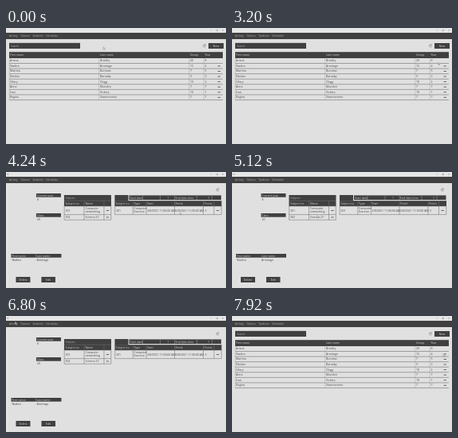
These frames come from a looping animation (276x146 px, 8 s). An HTML page:

```html
<!DOCTYPE html>
<html lang="en">
<head>
<meta charset="utf-8">
<title>Student records</title>
<style>
html, body { margin: 0; width: 100%; height: 100%; overflow: hidden; background: #e0e0e0; }
svg { display: block; width: 276px; height: 146px; }
text { font-family: "Open Sans", "Noto Sans", sans-serif; font-size: 3.5px; fill: #484848; }
.light { fill: #d2d2d2; }
.menu { fill: #b4b4b4; font-size: 3.2px; }
</style>
</head>
<body>
<svg viewBox="0 0 276 146" xmlns="http://www.w3.org/2000/svg">
  <rect width="276" height="146" fill="#e8e8e8"/>
  <g id="list"></g>
  <g id="detail"></g>
  <g id="chrome"></g>
  <path id="pointer" d="M0 0V3.1L.8 2.4 1.4 3.5 1.9 3.2 1.4 2.2H2.3Z" fill="#f4f4f4" stroke="#555" stroke-width=".35"/>
</svg>
<script>
const NS = "http://www.w3.org/2000/svg";
const DARK = "#404040";
const LOOP = 8000;
const byId = id => document.getElementById(id);
const list = byId("list"), detail = byId("detail"), chrome = byId("chrome"), pointer = byId("pointer");

function add(parent, tag, attrs) {
  const el = document.createElementNS(NS, tag);
  for (const key in attrs) el.setAttribute(key, attrs[key]);
  return parent.appendChild(el);
}
const box = (p, x, y, w, h, fill = DARK) => add(p, "rect", { x, y, width: w, height: h, fill });
const line = (p, d, stroke = "#707070", width = .6) =>
  add(p, "path", { d, stroke, "stroke-width": width, fill: "none" });
function label(p, x, y, str, cls = "", anchor = "start") {
  add(p, "text", { x, y, class: cls, "text-anchor": anchor }).textContent = str;
}
function button(p, x, y, w, str) {
  box(p, x, y, w, 7);
  label(p, x + w / 2, y + 4.8, str, "light", "middle");
}
const refresh = (p, x, y) => {
  line(p, `M${x + 1} ${y - 1}A1.5 1.5 0 1 0 ${x + 1.4} ${y + .6}`, "#555", .55);
  line(p, `M${x + 1.5} ${y - 1.8}V${y - .7}H${x + .4}`, "#555", .45);
};
const dash = (p, x, y) => line(p, `M${x - 1.7} ${y}h3.4`, "#444", .8);

function buildList() {
  const p = list;
  box(p, 0, 14, 276, 132, "#e0e0e0");
  box(p, 4, 18.8, 89, 7.2);
  label(p, 6, 23.7, "Search", "menu");
  refresh(p, 249, 22.3);
  button(p, 254, 19, 19, "New");
  box(p, 4, 30.2, 268, 7.8);
  [[5, "First name"], [118, "Last name"], [231, "Group"], [249.5, "Year"]]
    .forEach(([x, s]) => label(p, x, 35.3, s, "light"));
  const rows = [
    ["Ariana", "Bradley", "20", "8"], ["Nadine", "Armitage", "15", "4"],
    ["Martina", "Burrows", "7", "5"], ["Nicolas", "Barnaby", "9", "3"],
    ["Hilary", "Clegg", "10", "2"], ["Anna", "Mundon", "7", "7"],
    ["Ivan", "Vickery", "10", "1"], ["Regina", "Stanmoreton", "7", "7"]
  ];
  rows.forEach((row, i) => {
    const y = 41.1 + i * 6.58;
    [5, 118, 231, 249.5].forEach((x, c) => label(p, x, y + 1.2, row[c]));
    line(p, `M4 ${y + 3.4}H272`);
    if (i) dash(p, 267.3, y + .2);
  });
  line(p, "M4.2 38V90.5M116.7 38V90.5M229.8 38V90.5M248.2 38V90.5", "#8c8c8c", .35);
}

function field(p, x, y, w, name, value) {
  box(p, x, y, w, 4.7);
  label(p, x + 1, y + 3.6, name, "light");
  label(p, x + 1, y + 8.6, value);
}

function grid(p, xs, ys) {
  const x0 = xs[0], x1 = xs[xs.length - 1], y0 = ys[0], y1 = ys[ys.length - 1];
  line(p, xs.map(x => `M${x} ${y0}V${y1}`).join("") + ys.map(y => `M${x0} ${y}H${x1}`).join(""), "#666", .5);
}

function buildDetail() {
  const p = detail;
  box(p, 0, 14, 276, 132, "#e0e0e0");
  refresh(p, 264, 22.3);
  field(p, 36.5, 27, 31, "Current year", "8");
  field(p, 36.5, 52, 31, "Class", "20");
  field(p, 5, 103, 31, "First name", "Nadine");
  field(p, 36, 103, 32, "Last name", "Armitage");
  button(p, 11, 132, 18, "Delete");
  button(p, 43, 132, 17.5, "Edit");

  box(p, 71.5, 29, 59, 14);
  label(p, 73, 33.8, "Subjects", "menu");
  label(p, 73, 41, "Subject no.", "light");
  label(p, 98, 41, "Name", "light");
  line(p, "M71.5 36.2H130.5M96.5 36.2V43M121.5 36.2V43", "#858585", .4);
  grid(p, [71.7, 96.5, 121.5, 130.3], [43, 53.6, 60.3]);
  label(p, 73, 49.5, "301");
  label(p, 98, 47.1, "Computer");
  label(p, 98, 51.4, "networking");
  label(p, 73, 58.3, "302");
  label(p, 98, 58.3, "Science 27");
  dash(p, 126, 48.5);
  dash(p, 126, 57);

  box(p, 135, 29, 17, 7.4);
  box(p, 153, 29.4, 115.5, 5.6);
  label(p, 154, 33.5, "Start date", "light");
  label(p, 201, 33.5, "1", "light");
  label(p, 211, 33.5, "End date time", "light");
  label(p, 252, 33.5, "1", "light");
  line(p, "M170 29.4V35M192 29.4V35M210 29.4V35M238 29.4V35M257 29.4V35", "#a0a0a0", .5);
  box(p, 135, 36.2, 134, 6.8);
  [[136, "Subject no."], [159, "Type"], [175.5, "Start"], [211, "Finish"], [247, "Points"]]
    .forEach(([x, s]) => label(p, x, 41, s, "light"));
  line(p, "M157.8 36.2V43M174.5 36.2V43M210 36.2V43M246 36.2V43M259.5 36.2V43", "#858585", .4);
  grid(p, [135.2, 157.8, 174.5, 210, 246, 259.5, 268.8], [43, 53.6]);
  label(p, 136.5, 49.5, "301");
  label(p, 159, 47.1, "Computer");
  label(p, 159, 51.4, "Exercise");
  label(p, 175.5, 49.5, "2/8/2021 11:00:00 AM");
  label(p, 211, 49.5, "2/8/2021 11:30:00 AM");
  label(p, 248, 49.5, "3");
  dash(p, 264.2, 48.5);
}

let back, controls;
function buildChrome() {
  const p = chrome;
  box(p, 0, 0, 276, 6, "#e6e6e6");
  box(p, 0, 6, 276, 8);
  [[4, "Activity"], [18.5, "Classes"], [33.5, "Students"], [50, "Schedules"]]
    .forEach(([x, s]) => label(p, x, 11.3, s, "menu"));
  controls = line(p, "M256.5 3h2M264 2.2h1.6v1.6h-1.6zM271.2 2.2l1.6 1.6m0-1.6l-1.6 1.6", "#777", .35);
  back = line(p, "M3.9 2.9H1.5l1-1m-1 1l1 1", "#666", .4);
}

// Cubic bezier easing solved by bisection
function bezier(x1, y1, x2, y2) {
  const at = (a, b, u) => 3 * a * u * (1 - u) ** 2 + 3 * b * u * u * (1 - u) + u ** 3;
  return t => {
    if (t <= 0) return 0;
    if (t >= 1) return 1;
    let lo = 0, hi = 1;
    for (let i = 0; i < 24; i++) {
      const mid = (lo + hi) / 2;
      if (at(x1, x2, mid) < t) lo = mid; else hi = mid;
    }
    return at(y1, y2, lo);
  };
}
const leave = bezier(.7, 0, 1, .5);
const enter = bezier(.1, .9, .2, 1);
const OPEN = 3960, CLOSE = 6740, OUT = 150, IN = 300;

function place(el, shown, x) {
  el.setAttribute("visibility", shown ? "visible" : "hidden");
  el.setAttribute("transform", `translate(${x.toFixed(2)} 0)`);
}

// Pointer stops: time, x, y
const stops = [
  [0, 122, 23.5], [80, 122.5, 30], [160, 123, 36.5], [320, 123, 36.5], [560, 122.5, 24.5],
  [1120, 236, 42], [1500, 252, 40], [1920, 265, 39], [2000, 265, 38], [2400, 260, 22],
  [2800, 264, 37], [2880, 264, 37], [3100, 254, 42], [3360, 266, 45.5], [3920, 266, 45.5],
  [4080, 243, 51], [4720, 144, 50], [5100, 108, 55], [5600, 80, 49], [5680, 78, 48],
  [6320, 3, 2.5], [6720, 4, 3], [6800, 11, 7], [6960, 82, 28], [7520, 241, 55],
  [7760, 266, 48], [7840, 266, 48], [7920, 265.2, 47.8], [8000, 265.2, 47.8]
];

function movePointer(t) {
  const hidden = t >= 560 && t < 1120;
  let i = 0;
  while (i < stops.length - 2 && t >= stops[i + 1][0]) i++;
  const [t0, x0, y0] = stops[i], [t1, x1, y1] = stops[i + 1];
  const k = (t - t0) / (t1 - t0);
  pointer.setAttribute("visibility", hidden ? "hidden" : "visible");
  pointer.setAttribute("transform", `translate(${x0 + (x1 - x0) * k} ${y0 + (y1 - y0) * k})`);
}

function draw(t) {
  const openIn = OPEN + OUT, closeIn = CLOSE + OUT;
  const onDetail = t >= openIn && t < closeIn;
  const listX = t < openIn
    ? -21.6 * leave((t - OPEN) / OUT)
    : -28.8 * (1 - enter((t - closeIn) / IN));
  const detailX = t < CLOSE
    ? 28.8 * (1 - enter((t - openIn) / IN))
    : 21.6 * leave((t - CLOSE) / OUT);
  place(list, !onDetail, listX);
  place(detail, onDetail, detailX);
  back.setAttribute("visibility", t >= OPEN && t < CLOSE + 80 ? "visible" : "hidden");
  controls.setAttribute("stroke", t < 3760 ? "#777" : "#666");
  movePointer(t);
}

buildList();
buildDetail();
buildChrome();
const start = performance.now();
function tick() {
  draw((performance.now() - start) % LOOP);
  requestAnimationFrame(tick);
}
draw(0);
requestAnimationFrame(tick);
</script>
</body>
</html>
```
